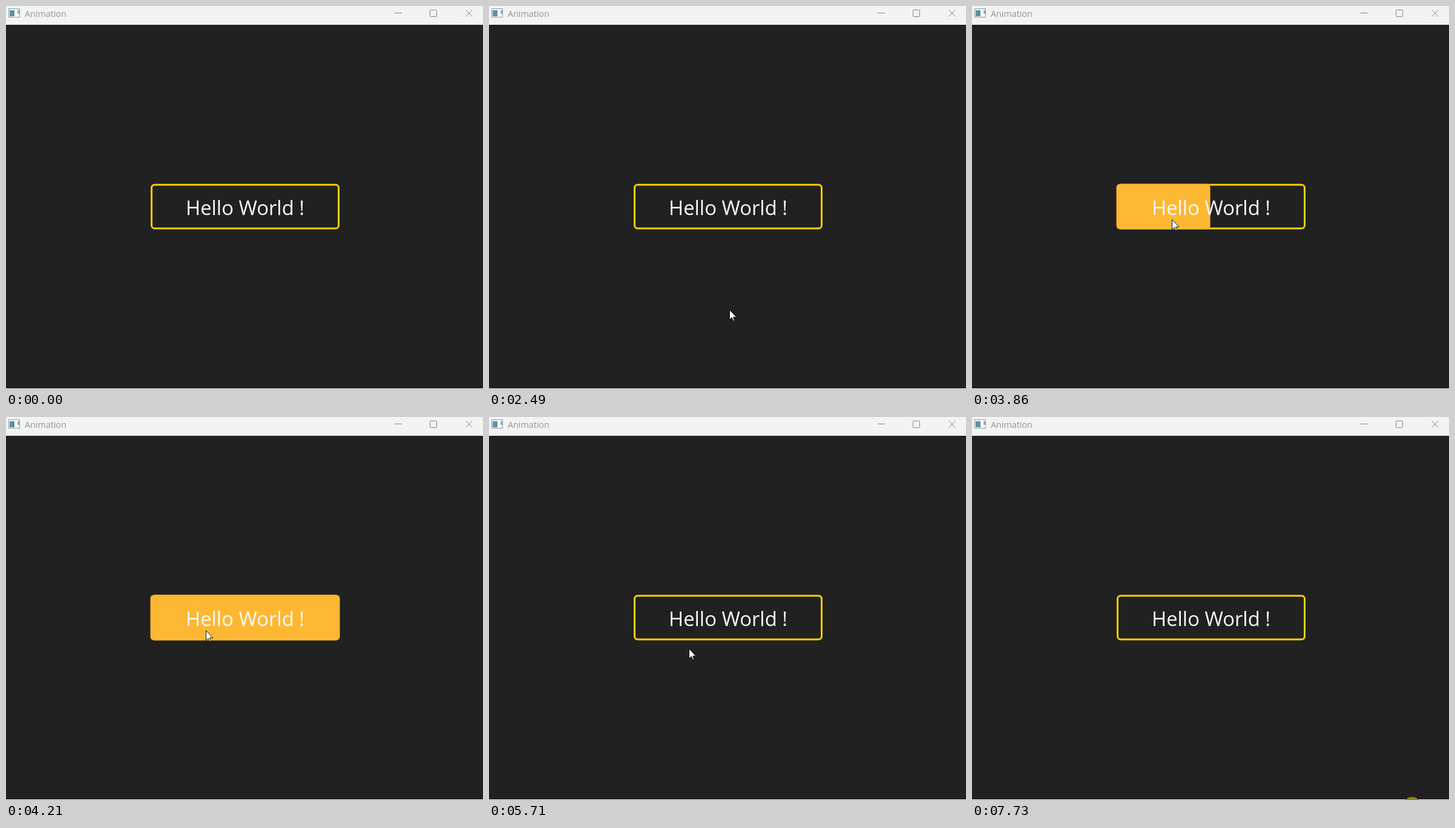
An HTML page for the animation above (7930 ms loop, 788x632 px).

```html
<!DOCTYPE html>
<html lang="en">
<head>
<meta charset="utf-8">
<title>Animation</title>
<style>
  html, body { margin: 0; width: 100%; height: 100%; overflow: hidden; background: #fff; }
  svg { display: block; }
  text { font-family: "Open Sans", "Noto Sans", sans-serif; }
</style>
</head>
<body>
<svg width="788" height="632" viewBox="0 0 788 632">
  <rect width="788" height="31" fill="#f2f4f3"/>
  <rect y="31" width="788" height="600" fill="#212121"/>

  <!-- title bar -->
  <rect x="4.5" y="4.5" width="18" height="14" fill="#f8fafa" stroke="#8b9a9b"/>
  <rect x="6" y="7" width="8" height="10" fill="#5c8fa3"/>
  <path d="M20.5 7v6" stroke="#6d8b8f" stroke-width="2"/>
  <text x="31" y="18" font-size="14.3" fill="#909392">Animation</text>
  <g fill="none" stroke="#858787">
    <path d="M642 11.5h12M759.5 6.5l11 11m0-11l-11 11"/>
    <rect x="700.5" y="6.5" width="11" height="11" rx="1"/>
  </g>

  <!-- button -->
  <rect x="240.5" y="295" width="309" height="72" rx="5" fill="none" stroke="#fdd000" stroke-width="3"/>
  <rect id="fill" x="238.5" y="293.5" height="75" rx="6" fill="#fdb833"/>
  <text x="395" y="345" font-size="32.8" text-anchor="middle" fill="#fbfbfd">Hello World !</text>

  <circle id="press" cx="727" cy="641.6" r="14.6" fill="#90890f"/>
  <path id="cursor" d="M.5 .5V16.7L4.2 13.2 6.6 18.6H8.8L6.6 12.4H11.8Z" fill="#fff" stroke="#000" stroke-width=".9"/>
</svg>
<script>
const LOOP = 7930, STEP = 70, WIDTH = 313;
const [fill, press, cursor] = ["fill", "press", "cursor"].map(id => document.getElementById(id));

// Pointer strokes: start and end time, then where the stroke arrives
const home = [713, 632];
const strokes = [
  [1120, 1330, 652, 606],
  [1660, 2010, 411, 506],
  [2490, 2490, 397, 501],
  [2560, 3170, 328, 408],
  [3240, 3800, 330, 352],
  [4870, 5170, 330, 382],
  [5970, 6250, 548, 459],
  [6580, 6790, 702, 548],
  [7050, 7330, 727, 641]
];

const clamp = p => Math.min(1, Math.max(0, p));
// Whole steps since start, allowing a little early arrival
const ticks = (t, start) => Math.floor((t - start) / STEP + 0.3);
const ramp = (t, start, n) => clamp((ticks(t, start) + 0.46) / n);
const easeOut = p => 1 - (1 - p) ** 1.5;

function pointer(t) {
  let [x, y] = home;
  for (const [start, end, toX, toY] of strokes) {
    const n = Math.round((end - start) / STEP) + 1;
    const p = easeOut(clamp((ticks(t, start) + 1) / n));
    x += (toX - x) * p;
    y += (toY - y) * p;
  }
  return [x, y].map(Math.round);
}

function draw() {
  const t = performance.now() % LOOP;
  cursor.setAttribute("transform", `translate(${pointer(t)})`);
  fill.setAttribute("width", WIDTH * (ramp(t, 3600, 9) - ramp(t, 5030, 10)));
  press.setAttribute("visibility", t >= 7730 ? "visible" : "hidden");
  requestAnimationFrame(draw);
}
draw();
</script>
</body>
</html>
```
